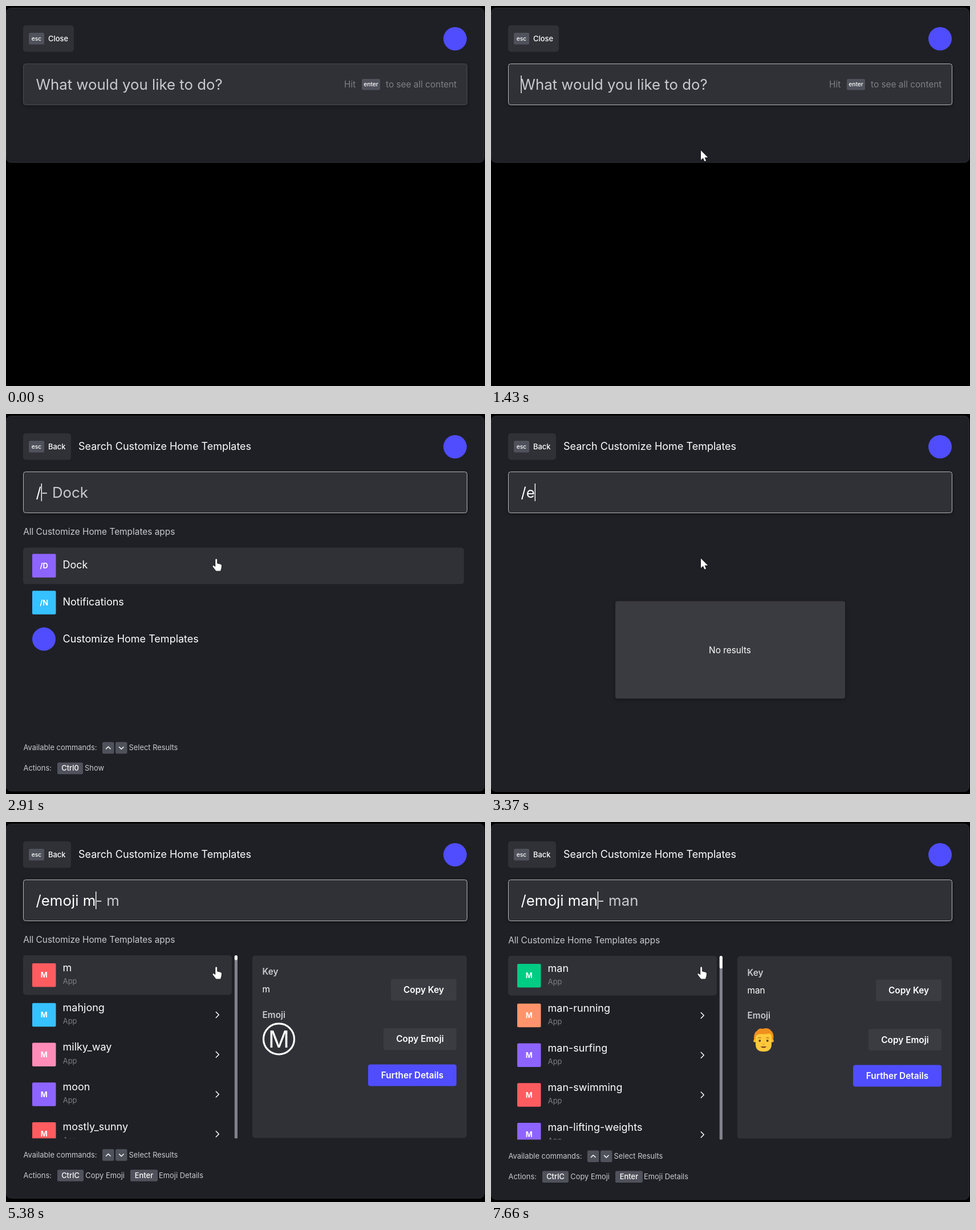
Recreate the animation shown at these times as an HTML page. Size 840 by 667 pixels, loop 8 s.

```html
<!DOCTYPE html>
<html lang="en">
<head>
<meta charset="utf-8">
<title>Command palette</title>
<style>
  html, body { margin: 0; width: 100%; height: 100%; overflow: hidden; background: #000; }
  svg { display: block; width: 840px; height: 667px; }
  text { font-family: Inter, sans-serif; fill: #fff; white-space: pre; }
  .big { font-size: 25.8px; }
  .title { font-size: 18px; }
  .body { font-size: 15.4px; }
  .small { font-size: 12.9px; }
  .tiny { font-size: 10.3px; }
  .mid { font-weight: 500; }
  .bold { font-weight: 600; }
  .icon { font-size: 12.9px; font-weight: 700; }
  .soft { fill: #c9cace; }
  .dim { fill: #7d7f88; }
  .center { text-anchor: middle; }
  .line { fill: none; stroke: #fff; stroke-width: 1.5; stroke-linecap: round; stroke-linejoin: round; }
  .raised { filter: drop-shadow(0 2px 3px rgba(0, 0, 0, .35)); }
</style>
</head>
<body>
<svg id="stage" viewBox="0 0 840 667" xmlns="http://www.w3.org/2000/svg"></svg>
<script>
const LOOP = 8000, BLINK = 530, FRAME = 70;
const SMALL = 275, MEDIUM = 519.5, LARGE = 663;
const RED = '#ff5c60', BLUE = '#36c1ff', PINK = '#ff8cb8', VIOLET = '#8e64ff',
      GREEN = '#00cc83', ORANGE = '#ff946b', INDIGO = '#4f4dfd',
      SURFACE = '#303136', BUTTON = '#3b3c42', KEYCAP = '#4f515b';

const rect = (x, y, w, h, fill, r = 4, more = '') =>
  `<rect x="${x}" y="${y}" width="${w}" height="${h}" rx="${r}" fill="${fill}" ${more}/>`;
const text = (x, y, cls, str) => `<text x="${x}" y="${y}" class="${cls}">${str}</text>`;
const path = (d, attrs) => `<path d="${d}" ${attrs}/>`;
const group = (id, inner, attrs = '') => `<g id="${id}" ${attrs}>${inner}</g>`;
const badge = (x, y) => `<circle cx="${x}" cy="${y}" r="20.5" fill="${INDIGO}"/>`;
const tile = (y, color, label) =>
  rect(46, y, 41.5, 41.5, color, 2) + text(66.7, y + 25.4, 'icon center', label);
const button = (x, y, w, fill, label) =>
  rect(x, y, w, 38, fill) + text(x + w / 2, y + 24.6, 'body bold center', label);
const keycap = (x, y, w, label) =>
  rect(x, y, w, 20.5, KEYCAP, 2.5) + text(x + w / 2, y + 14.6, 'small mid center', label);

const escButton = (width, label) =>
  rect(30, 34, width, 46.5, SURFACE, 5) + rect(40, 47, 27, 20.5, KEYCAP, 2.5) +
  text(53.5, 61, 'tiny mid center', 'esc') + text(74, 61.6, 'small mid', label);

function actions(id, inner) {
  return group(id, text(30.5, 627, 'small soft', 'Actions:') + inner);
}

function rows(items) {
  return items.map(([name, color], i) => {
    const y = 235 + i * 69.75;
    return (i ? path(`M368.3 ${y + 29.8}l5 5 -5 5`, 'class="line"')
              : rect(30, y, 366, 69.5, SURFACE, 5)) +
      tile(y + 14, color, 'M') + text(99.5, y + 28, 'title', name) +
      text(99.8, y + 50.2, 'small dim', 'App');
  }).join('');
}

function results(id, items, thumb, emoji) {
  return group(id, rows(items) +
    rect(400.8, 235, 5.2, 323, '#80818a', 2.6) + rect(400.8, 235, 5.2, thumb, '#fff', 2.6) +
    rect(432, 235.5, 376, 320, SURFACE, 5) +
    text(449.5, 269.6, 'body bold soft', 'Key') + text(449.5, 300.6, 'body', items[0][0]) +
    text(449.5, 345, 'body bold soft', 'Emoji') + emoji +
    button(675, 276.5, 115, BUTTON, 'Copy Key') +
    button(662, 363, 128, BUTTON, 'Copy Emoji') +
    button(635, 426.5, 155, INDIGO, 'Further Details'));
}

const circledM = '<circle cx="478.5" cy="382" r="27" fill="none" stroke="#fff" stroke-width="3.2"/>' +
  '<text x="478.5" y="397" class="center" font-size="41">M</text>';

const mahjongTile = rect(463, 361, 31, 42, '#e9e9ec', 4) + rect(463, 399, 31, 4, '#4caf6a', 2) +
  rect(470, 373, 17, 11, 'none', 0, 'stroke="#e2363f" stroke-width="3"') +
  path('M478.5 366v31', 'stroke="#e2363f" stroke-width="3"');

const manFace =
  path('M461 383q-1-13 6-17 3-5 10-3 9-3 14 3 6 5 4 17l-3 2h-28z', 'fill="#f0901e"') +
  '<circle cx="462.8" cy="384" r="2.6" fill="#f5b62c"/><circle cx="493.2" cy="384" r="2.6" fill="#f5b62c"/>' +
  path('M464 376q3-4 9-4 9 1 16-1 3 2 3 6v13q0 13-14 13t-14-13z', 'fill="#ffc93c"') +
  path('M468.5 379.5q2.5-2 5 0M482.5 379.5q2.5-2 5 0', 'fill="none" stroke="#c9741a" stroke-width="1.6"') +
  '<circle cx="471.3" cy="384" r="1.9" fill="#54402f"/><circle cx="484.8" cy="384" r="1.9" fill="#54402f"/>' +
  path('M476.5 389.5q1.5 1.2 3 0', 'fill="none" stroke="#dd9423" stroke-width="1.4"') +
  path('M472.5 394q5.5 5 11 0z', 'fill="#7a3b22"');

const stage = document.getElementById('stage');
stage.innerHTML = `
<defs>
  <clipPath id="panelClip"><rect id="panelMask" x="0" y="3" width="839" rx="8"/></clipPath>
  <clipPath id="listClip"><rect id="listMask" x="0" y="190" width="839"/></clipPath>
</defs>` +
group('panel',
  rect(0.5, 3.5, 838, 270, '#1f2025', 8, 'id="frame" stroke="#2e2f34"') +
  group('body',
    badge(787.5, 57.5) +
    group('homeHead', escButton(89, 'Close')) +
    group('searchHead', escButton(84, 'Back') + text(127, 63.4, 'title', 'Search Customize Home Templates')) +
    rect(30.5, 101.5, 778, 72, SURFACE, 4, 'id="field" class="raised"') +
    group('hint',
      text(52.5, 147, 'big soft', 'What would you like to do?') +
      text(593, 143, 'body dim', 'Hit') + rect(624, 128, 32, 19.5, KEYCAP, 2.5) +
      text(640, 141.2, 'tiny mid center', 'enter') + text(666, 143, 'body dim', 'to see all content')) +
    '<text x="52.5" y="147" class="big"><tspan id="typed"></tspan><tspan id="ghost" class="soft"></tspan></text>' +
    rect(52.3, 122, 1.4, 31, '#fff', 0, 'id="caret"') +
    group('none', rect(218, 257, 403, 171, '#3a3b40', 4, 'class="raised"') +
      text(419, 348, 'body center', 'No results')) +
    group('content',
      text(30.2, 212.8, 'body soft', 'All Customize Home Templates apps') +
      group('lists',
        group('dock',
          rect(30, 235, 773, 64, SURFACE, 5) + tile(246, VIOLET, '/D') + tile(310.7, BLUE, '/N') +
          badge(66.5, 395.5) + text(99.5, 271.8, 'title', 'Dock') +
          text(99.5, 336.2, 'title', 'Notifications') +
          text(99.5, 401, 'title', 'Customize Home Templates')) +
        results('m', [['m', RED], ['mahjong', BLUE], ['milky_way', PINK], ['moon', VIOLET],
          ['mostly_sunny', RED]], 8.5, circledM) +
        results('ma', [['mahjong', BLUE], ['mans_shoe', PINK], ['maple_leaf', VIOLET], ['man', GREEN],
          ['mask', RED]], 14, mahjongTile) +
        results('man', [['man', GREEN], ['man-running', ORANGE], ['man-surfing', VIOLET],
          ['man-swimming', RED], ['man-lifting-weights', VIOLET]], 22, manFace),
        'clip-path="url(#listClip)"')) +
    group('footer',
      text(30.5, 591.2, 'small soft', 'Available commands:') +
      rect(169, 576.5, 20.5, 20.5, KEYCAP, 2.5) + rect(192, 576.5, 20.5, 20.5, KEYCAP, 2.5) +
      path('M175.5 588.5l3.8-3.8 3.8 3.8M198.5 585.2l3.8 3.8 3.8-3.8', 'class="line"') +
      text(215.5, 591.2, 'small soft', 'Select Results') +
      actions('dockActions', keycap(90, 612.5, 45, 'Ctrl0') + text(138, 627, 'small soft', 'Show')) +
      actions('emojiActions', keycap(90, 612.5, 46, 'CtrlC') +
        text(139.3, 627, 'small soft', 'Copy Emoji') + keycap(218, 612.5, 48, 'Enter') +
        text(268, 627, 'small soft', 'Emoji Details'))),
    'clip-path="url(#panelClip)"')) +
path('M368 253.5v16.8l3.9-3.5 2.5 5.8 2.7-1.2-2.5-5.6h5.6z',
  'id="arrow" fill="#fff" stroke="#000" stroke-width=".8" paint-order="stroke"') +
path('M367.2 255.5q1.5-2.4 3 0v6.8l6 1.4q2 .6 2 2.4l-.8 5.4-1.4 4h-7.6l-5.8-7.4q-.6-2 1.4-2l3.2 2.2z',
  'id="hand" fill="#fff" stroke="#000" stroke-width="1" paint-order="stroke"');

const el = {};
stage.querySelectorAll('[id]').forEach(node => el[node.id] = node);
const show = (id, on) => el[id].style.display = on ? '' : 'none';

// time, typed text, view, completion
const states = [
  [0, '', 'home'],
  [2500, '/', 'none'], [2640, '/', 'dock', 'Dock'],
  [3300, '/e', 'dock'], [3370, '/e', 'none'],
  [3580, '/em', 'none'], [3840, '/emo', 'none'], [4110, '/emoj', 'none'],
  [4370, '/emoji', 'none'], [4700, '/emoji ', 'none'],
  [5110, '/emoji m', 'none'], [5170, '/emoji m', 'm', 'm'],
  [5520, '/emoji ma', 'm'], [5590, '/emoji ma', 'ma', 'mahjong'],
  [6580, '/emoji man', 'ma'], [6650, '/emoji man', 'man', 'man']
];
// start, duration, from, to
const resizes = [
  [0, 0, SMALL, SMALL], [200, 420, SMALL, 661], [1360, 0, SMALL, SMALL],
  [2500, 400, SMALL, LARGE], [3370, 210, LARGE, MEDIUM], [5170, 280, MEDIUM, LARGE]
];
// moments at which the caret starts a fresh blink
const caretResets = [1360, 2840, 3300, 3580, 3840, 4110, 4370, 4700, 5110, 5520, 6580];

const latest = (list, t, time = item => item[0]) => list.filter(item => time(item) <= t).pop();
const stepped = (t, start) => Math.floor((t - start) / FRAME) * FRAME;

function panelBottom(t) {
  const [start, span, from, to] = latest(resizes, t);
  const p = span ? Math.min(1, stepped(t, start) / span) : 1;
  return from + (to - from) * (1 - (1 - p) ** 3);
}

function panelOpacity(t) {
  if (t >= 1360 || t < 750) return 1;
  return Math.max(0, 1 - (stepped(t, 750) + FRAME) / 280);
}

function render(t) {
  const [, typed, view, ghost] = latest(states, t);
  const bottom = panelBottom(t), shift = bottom - LARGE;
  const listed = view !== 'home' && view !== 'none';
  const focused = (t >= 1430 && t < 2500) || t >= 2840;
  const lift = Math.max(-1.5, shift / 2);

  el.panel.style.opacity = panelOpacity(t);
  el.frame.setAttribute('height', bottom - 4);
  el.panelMask.setAttribute('height', bottom - 3);
  el.listMask.setAttribute('height', Math.max(0, bottom - 105.5 - lift - 190));
  el.field.setAttribute('stroke', focused ? '#b4b5b9' : '#4b4c51');

  show('homeHead', view === 'home');
  show('searchHead', view !== 'home');
  show('hint', view === 'home');
  show('content', listed);
  show('footer', listed);
  for (const id of ['none', 'dock', 'm', 'ma', 'man']) show(id, view === id);
  show('dockActions', view === 'dock');
  show('emojiActions', view !== 'dock');

  const cardCenter = Math.max(279.5, (165 + bottom) / 2);
  el.none.setAttribute('transform', `translate(0 ${cardCenter - 342.5})`);
  el.content.setAttribute('transform', `translate(0 ${lift})`);
  el.footer.setAttribute('transform', `translate(0 ${shift})`);

  el.typed.textContent = typed;
  el.ghost.textContent = ghost ? '- ' + ghost : '';
  const reset = latest(caretResets, t, time => time) || 0;
  show('caret', focused && Math.floor((t - reset) / BLINK) % 2 === 0);
  el.caret.setAttribute('x', 52.3 + (typed ? el.typed.getComputedTextLength() : 0));

  show('arrow', t >= 1030 && !listed);
  show('hand', listed);
}

const origin = performance.now();
function tick() {
  render((performance.now() - origin) % LOOP);
  requestAnimationFrame(tick);
}
tick();
</script>
</body>
</html>
```
